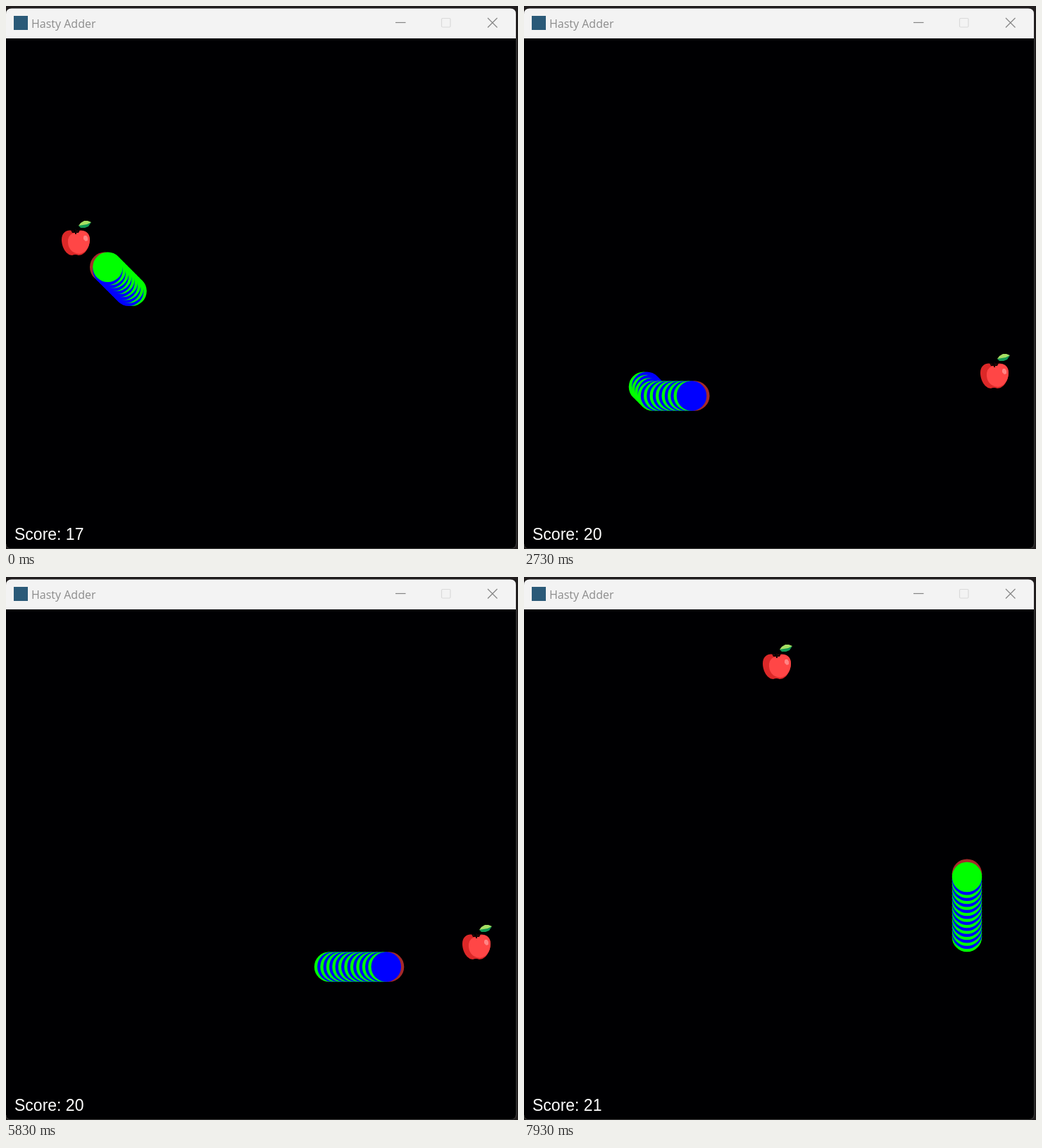
Recreate the animation shown at these times as an HTML page with a canvas. Size 727 by 771 pixels, loop 8000 ms.

```html
<!DOCTYPE html>
<html lang="en">
<head>
<meta charset="utf-8">
<title>Hasty Adder</title>
<style>
html, body { margin: 0; width: 100%; height: 100%; overflow: hidden; background: #211e1e; }
canvas, svg { position: absolute; left: 0; top: 0; width: 727px; height: 771px; }
.title { font: 16px "Open Sans", "Noto Sans", sans-serif; fill: #8c8c8c; }
.score { font: 23px "Liberation Sans", sans-serif; fill: #fff; }
</style>
</head>
<body>
<canvas id="game" width="727" height="771"></canvas>
<svg viewBox="0 0 727 771">
  <path d="M0 46V11Q0 3.500 8 3.500H716Q724 3.500 724 11V46Z" fill="#f3f3f3"/>
  <path d="M724.500 46V763Q724.500 770.500 716 770.500H7Q0 770.500 0 764" fill="none" stroke="#3c3c3c"/>
  <rect x="11" y="14" width="20" height="20" fill="#2b5a78"/>
  <text class="title" x="36" y="31">Hasty Adder</text>
  <g fill="none" stroke="#858585" stroke-width="1.200">
    <path d="M553 23.500H567.500"/>
    <rect x="618.500" y="17.500" width="12.500" height="12.500" rx="1.500" stroke="#dadada"/>
    <path d="M684 17L697.500 30.500M697.500 17L684 30.500"/>
  </g>
  <text class="score" id="score" x="12" y="757.500">Score: 17</text>
</svg>
<script>
const ctx = document.getElementById("game").getContext("2d");
const scoreText = document.getElementById("score");
const LOOP = 8000, STEP = 4.25, RADIUS = 21.25, FIRST = -18;

// The route of the head, one letter per step.
const route = "UL".repeat(10) + "D".repeat(33) + "RD".repeat(11) + "R".repeat(105) + "U".repeat(31);
const moves = { U: [0, -1], D: [0, 1], L: [-1, 0], R: [1, 0] };
const points = [[178.5, 409]];
for (const letter of route) {
  const [x, y] = points[points.length - 1];
  const [dx, dy] = moves[letter];
  points.push([x + dx * STEP, y + dy * STEP]);
}

// Bursts of screen updates: first time, last time, updates, head step reached.
const bursts = [
  [60, 60, 1, 5], [260, 260, 1, 11], [430, 1230, 9, 41], [1330, 1660, 5, 50],
  [1760, 2100, 5, 62], [2230, 2360, 3, 66], [2630, 3430, 9, 87], [3500, 3630, 3, 91],
  [3700, 4300, 8, 104], [4360, 4600, 4, 110], [4660, 5000, 6, 125], [5160, 5200, 2, 130],
  [5360, 5830, 7, 142], [5900, 5960, 2, 145], [6130, 6600, 8, 160], [6660, 6900, 5, 168],
  [6960, 7630, 9, 190], [7900, 7930, 2, 193]
];

// Apple corner and the head step at which it is eaten.
const apples = [
  { x: 78, y: 305, eaten: 3 }, { x: 196, y: 561, eaten: 57 }, { x: 247, y: 549, eaten: 68 },
  { x: 647, y: 494, eaten: 164 }, { x: 338, y: 96, eaten: Infinity }
];

const appleParts = [
  ["#dc2828", "M20 16C14 11 1 13 1 27C1 38 8 49 16 49Q20 47 25 49C34 49 41 38 41 26C41 13 26 11 20 16Z"],
  ["#ff4646", "M22 17C30 11 41 15 41 27C41 38 34 46 26 47C15 46 9 38 10 27Q12 17 22 17Z"],
  ["#ff8585", "M33 21H36L38 24V28L35 29L32 26V23Z"],
  ["#100404", "M14 13L18 15H20V12H22V15L27 13L25 17H22V19H20V17H16Z"],
  ["#129956", "M25 7L43 2L39 8L34 10H28Z"],
  ["#a5df63", "M25 7L28 3L33 0H38L43 2L37 5L31 6Z"]
].map(([color, path]) => [color, new Path2D(path)]);

function headStep(time) {
  let step = 0;
  for (const [start, end, count, reached] of bursts) {
    if (time < start) break;
    const gap = (end - start) / Math.max(1, count - 1);
    const done = gap ? Math.min(count, Math.floor((time - start) / gap + 1e-6) + 1) : count;
    step += Math.round((reached - step) * done / count);
  }
  return step;
}

function disc(step, color) {
  const [x, y] = points[step - FIRST];
  ctx.fillStyle = color;
  ctx.beginPath();
  ctx.arc(x, y, RADIUS, 0, Math.PI * 2);
  ctx.fill();
}

function drawApple({ x, y }) {
  ctx.save();
  ctx.translate(x, y);
  for (const [color, path] of appleParts) {
    ctx.fillStyle = color;
    ctx.fill(path);
  }
  ctx.restore();
}

function draw(time) {
  const head = headStep(time);
  const eaten = apples.filter(apple => head >= apple.eaten).length;
  const length = 17 + eaten;
  ctx.clearRect(0, 0, 727, 771);
  ctx.fillStyle = "#000002";
  ctx.beginPath();
  ctx.roundRect(0, 46, 724, 725, [0, 0, 8, 8]);
  ctx.fill();
  drawApple(apples[eaten]);
  disc(head, "#a52a2a");
  for (let i = 0; i < length; i++) disc(head - length + i, i % 2 ? "#0000ff" : "#00ff00");
  scoreText.textContent = "Score: " + length;
}

const begin = performance.now();
function tick() {
  draw((performance.now() - begin) % LOOP);
  requestAnimationFrame(tick);
}
tick();
</script>
</body>
</html>
```
